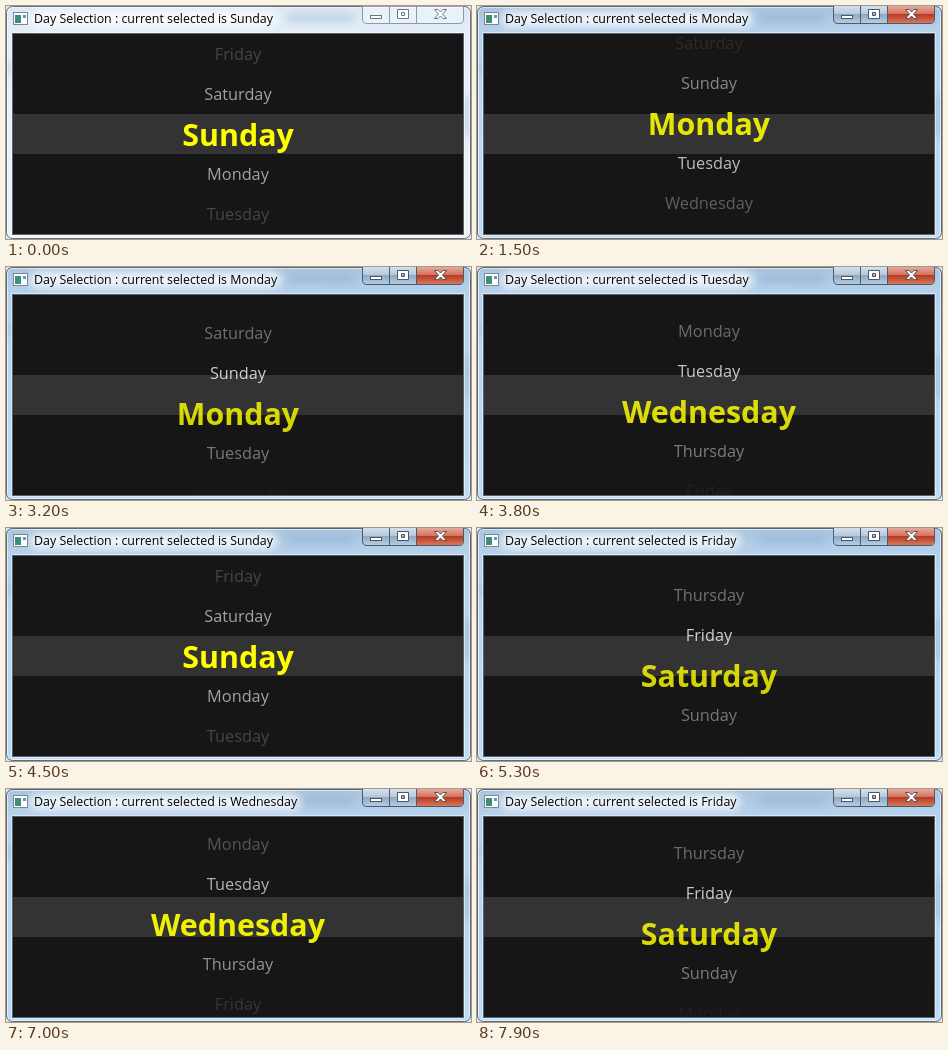
Recreate the animation shown at these times as an HTML page. Size 465 by 233 pixels, loop 8000 ms.

```html
<!DOCTYPE html>
<html lang="en">
<head>
<meta charset="utf-8">
<title>Day Selection</title>
<style>
html, body { margin: 0; width: 100%; height: 100%; overflow: hidden; background: #dce8f2; }
svg { display: block; width: 465px; height: 233px; font: 16.3px "Open Sans", "Noto Sans", sans-serif; }
#title { font-size: 12.4px; }
#days text { text-anchor: middle; fill: #fff; }
#days .current { font-size: 30.4px; font-weight: 700; fill: #ff0; }
.idle .active, svg:not(.idle) .inactive { display: none; }
</style>
</head>
<body>
<svg viewBox="0 0 465 233" class="idle">
  <defs>
    <linearGradient id="pale" x2="0" y2="1">
      <stop stop-color="#dce9f5"/><stop offset=".12" stop-color="#e3eef8"/><stop offset="1" stop-color="#eaf2f9"/>
    </linearGradient>
    <linearGradient id="glass" x2="0" y2="1">
      <stop stop-color="#a9c4df"/><stop offset=".12" stop-color="#b7d2ec"/><stop offset="1" stop-color="#bfdaf4"/>
    </linearGradient>
    <linearGradient id="steel" x2="0" y2="1">
      <stop stop-color="#d3e0ed"/><stop offset=".48" stop-color="#b5c8dc"/>
      <stop offset=".5" stop-color="#8fa9c3"/><stop offset="1" stop-color="#b4cde4"/>
    </linearGradient>
    <linearGradient id="red" x2="0" y2="1">
      <stop stop-color="#e5aa9c"/><stop offset=".48" stop-color="#d2705c"/>
      <stop offset=".5" stop-color="#b83a22"/><stop offset="1" stop-color="#d8775a"/>
    </linearGradient>
    <filter id="blur" x="-30%" y="-100%" width="160%" height="300%"><feGaussianBlur stdDeviation="4"/></filter>
    <clipPath id="view"><rect x="7" y="28" width="450" height="200"/></clipPath>
    <clipPath id="frame"><rect width="465" height="233" rx="6"/></clipPath>
    <path id="buttons" d="M356.5 -1V13Q356.5 17.5 361 17.5H453Q457.5 17.5 457.5 13V-1M383.5 0V17M410.5 0V17"/>
    <g id="icons">
      <rect x="364.5" y="9.5" width="11" height="3"/>
      <path fill-rule="evenodd" d="M391.500 3.500h11v9h-11zM395.500 6.500h3v3h-3z"/>
      <path d="M428.500 3.500h3.500l2.500 2.500 2.500 -2.500h3.500l-4 4.500 4 4.500h-3.500l-2.500 -2.500 -2.500 2.500h-3.500l4 -4.500z"/>
    </g>
  </defs>

  <g clip-path="url(#frame)">
    <rect class="inactive" width="465" height="233" fill="url(#pale)"/>
    <rect class="active" width="465" height="233" fill="url(#glass)"/>
    <g filter="url(#blur)" fill="#7395b4" opacity=".4">
      <rect x="282" y="9" width="66" height="6"/>
      <rect x="0" y="56" width="6" height="12"/>
      <rect x="459" y="90" width="6" height="40"/>
    </g>
    <rect id="glow" x="24" y="5" width="250" height="16" rx="8" fill="#fff" opacity=".8" filter="url(#blur)"/>
    <rect x="1.500" y="1.500" width="462" height="230" rx="5" fill="none" stroke="#fff" stroke-opacity=".6"/>
  </g>
  <rect x=".5" y=".5" width="464" height="232" rx="6" fill="none" stroke="#43525f" stroke-opacity=".8"/>

  <rect x="7.500" y="6.500" width="14" height="12" fill="#fff" stroke="#7d8790"/>
  <path d="M9 9h6v8h-6z" fill="#3d8f7c"/><path d="M17 9h3v3h-3z" fill="#6e94bd"/>

  <g class="inactive">
    <use href="#buttons" fill="#fff" fill-opacity=".35" stroke="#8c9aa8"/>
    <use href="#icons" fill="#fff" stroke="#6d7782"/>
  </g>
  <g class="active">
    <path d="M410 0H457V13Q457 17 453 17H410z" fill="url(#red)"/>
    <path d="M357 0H410V17H361Q357 17 357 13z" fill="url(#steel)"/>
    <use href="#buttons" fill="none" stroke="#4c5a69"/>
    <use href="#icons" fill="#fff" stroke="#4d5662"/>
  </g>

  <text id="title" x="28" y="17"></text>

  <rect x="5.500" y="26.500" width="453" height="203" fill="none" stroke="#fff" stroke-opacity=".45"/>
  <rect x="6" y="27" width="452" height="202" fill="#56626d"/>
  <rect x="7" y="28" width="450" height="200" fill="#161616"/>
  <rect x="7" y="108" width="450" height="40" fill="#333"/>
  <g id="days" clip-path="url(#view)"></g>
</svg>
<script>
const NAMES = ['Sunday', 'Monday', 'Tuesday', 'Wednesday', 'Thursday', 'Friday', 'Saturday'];
const LOOP = 8000, TICK = 100, ROW = 40, MIDDLE = 128;
const TITLE_LEAD = 0.3; // the caption updates slightly ahead of the wheel

// wheel position in days at each tick
const KEYS = [[0, 0], [7, 0], [9, .1], [12, .7], [15, 1.28], [18, 1.5], [19, 1.9], [22, 2.4],
  [23, 2.95], [25, 3.15], [27, 2.8], [30, 1.1], [32, .55], [33, .42], [34, -.4], [35, -1.3],
  [37, -3.5], [39, -5.3], [41, -6.7], [42, -7.15], [43, -7.25], [44, -7.1], [45, -7], [49, -7],
  [50, -7.2], [52, -8], [53, -8.475], [54, -8.85], [55, -9.1], [57, -9], [65, -9], [67, -9.7],
  [70, -11.175], [74, -12.8], [77, -14.4], [79, -15.41], [81, -16.4]];

const svg = document.querySelector('svg');
const title = document.getElementById('title');
const glow = document.getElementById('glow');
const days = document.getElementById('days');
const rows = Array.from({ length: 7 }, () => {
  const row = document.createElementNS(svg.namespaceURI, 'text');
  row.setAttribute('x', 232);
  return days.appendChild(row);
});

const dayName = i => NAMES[((i % 7) + 7) % 7];

function wheelAt(tick) {
  const n = KEYS.findIndex(k => k[0] > tick);
  const [t0, p0] = KEYS[n - 1], [t1, p1] = KEYS[n];
  return p0 + (p1 - p0) * (tick - t0) / (t1 - t0);
}

function draw(tick) {
  const pos = wheelAt(tick), current = Math.round(pos);
  rows.forEach((row, k) => {
    const day = current + k - 3, offset = ROW * (day - pos), bold = day === current;
    row.textContent = dayName(day);
    row.setAttribute('class', bold ? 'current' : '');
    row.setAttribute('y', Math.round(MIDDLE + offset) + (bold ? 11.5 : 6));
    row.setAttribute('opacity', Math.max(0, 1 - Math.abs(offset) / 100));
  });
  title.textContent = 'Day Selection : current selected is ' +
    dayName(Math.round(wheelAt(tick + TITLE_LEAD)));
  glow.setAttribute('width', title.getComputedTextLength() + 8);
  svg.setAttribute('class', tick < 8 ? 'idle' : '');
}

const start = performance.now();
function frame() {
  draw(Math.floor((performance.now() - start) % LOOP / TICK));
  requestAnimationFrame(frame);
}
frame();
</script>
</body>
</html>
```
